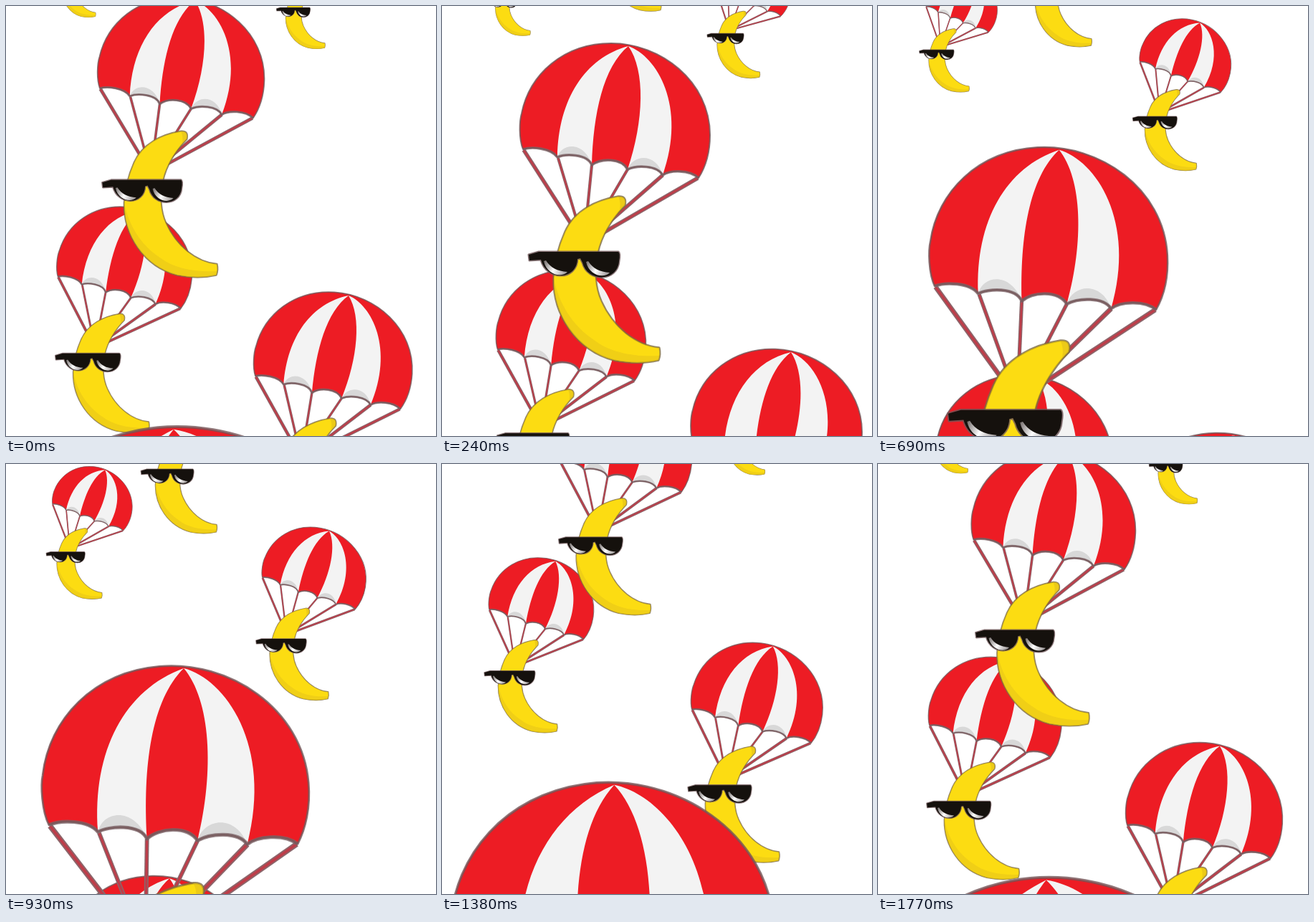
Animation of 600x600 px, one loop 1800 ms. Source, as an HTML page with a canvas:

```html
<!DOCTYPE html>
<html lang="en">
<head>
<meta charset="utf-8">
<title>Parachuting bananas</title>
<style>
  html, body { margin: 0; width: 100%; height: 100%; overflow: hidden; background: #fff; }
  canvas { display: block; width: 100vw; height: 100vh; }
</style>
</head>
<body>
<canvas id="stage" width="600" height="600"></canvas>
<script>
const ctx = document.getElementById('stage').getContext('2d');
const LOOP = 1800, STEP = 30;

// All shapes share one drawing space; ropes meet at the harness.
const HARNESS = [198, 332];
const SPIN = -0.0071; // degrees per ms

const hemCurve = 'C345 228 318 229 308 236 C300 222 272 222 259 228 C250 212 222 212 209 222 ' +
  'C203 206 172 206 161 211 C152 198 125 196 113 200';
const canopy = new Path2D('M113 200 C107 185 108 160 111 150 C122 95 170 52 236 52 ' +
  'C305 52 374 105 374 180 C374 205 367 226 358 240 ' + hemCurve + 'Z');
const hem = new Path2D('M358 240 ' + hemCurve);
const stripes = new Path2D(
  'M260 56 C200 72 162 130 161 211 C172 206 203 206 209 222 C211 150 225 85 260 56Z ' +
  'M260 56 C284 90 282 160 259 228 C272 222 300 222 308 236 C342 140 300 70 260 56Z');
const folds = new Path2D(
  'M161 211 C168 189 200 190 209 222 C203 206 172 206 161 211Z ' +
  'M259 228 C268 205 300 206 308 236 C300 222 272 222 259 228Z');
const ropeTops = [[114, 201], [162, 212], [209, 222], [259, 228], [308, 236], [357, 240]];

const banana = new Path2D('M246 266 C215 271 185 286 172 315 C164 333 157 355 156 380 ' +
  'C155 430 187 480 240 494 C265 499 285 498 302 494 Q305 486 303 477 ' +
  'C270 474 238 448 222 412 C213 392 212 370 217 345 C222 320 238 295 255 278 Q258 265 246 266Z');
const bananaShade = new Path2D('M156 380 C155 430 187 480 240 494 C265 499 285 498 302 494 ' +
  'L303 488 C270 490 235 484 212 466 C182 446 163 415 156 380Z');
const bananaTip = new Path2D('M246 266 Q258 265 255 278 L248 284 Q250 274 246 266Z');
const glasses = new Path2D('M121 347 L135 343 L246 343 Q249 345 247 356 C245 385 203 386 196 358 ' +
  'L193 352 L189 353 C188 383 146 384 138 354 L122 355Z');
const glint = new Path2D('M142 356 C146 375 167 380 175 371 C161 370 151 365 145 355Z');

const glintFill = ctx.createLinearGradient(142, 357, 176, 374);
glintFill.addColorStop(0, '#77706f');
glintFill.addColorStop(0.45, '#ffffff');
glintFill.addColorStop(1, '#8d8686');

// Keys: time, harness x, harness y, scale. "level" is when the canopy has no extra tilt.
const flyers = [
  { level: 2550, keys: [
    [-300, 98, -60, .295], [0, 92, -36, .312], [240, 88.5, -13, .328], [450, 88, 14, .348],
    [690, 87, 57, .38], [930, 89, 118, .425], [1380, 102, 282.6, .556], [1800, 124, 477, .714],
    [2040, 138, 587.6, .79], [2250, 150, 677.5, .857], [2490, 162, 775, .93], [2850, 177, 896, 1.04]] },
  { level: 2300, keys: [
    [-700, 420, -58, .335], [-420, 414, -42, .345], [0, 406, -1.7, .37], [240, 401, 34, .402],
    [450, 397, 79, .438], [690, 393, 149, .486], [930, 391.5, 238, .552], [1380, 397, 440.5, .696],
    [1800, 412, 631, .836], [2040, 423, 730, .902], [2250, 432, 810, .97], [2600, 440, 925, 1.08]] },
  { level: 2040, keys: [
    [0, 266, -84, .43], [240, 257, -69, .46], [450, 250.5, -54.5, .49], [690, 242, -31, .53],
    [930, 233, 1, .578], [1380, 217, 94.5, .7], [1800, 202, 233, .878], [2040, 198, 332, 1],
    [2250, 194.5, 431.5, 1.118], [2490, 194.5, 550, 1.252], [2730, 194.5, 678, 1.402],
    [3180, 202, 927, 1.7], [3570, 217, 1146, 2], [3700, 222, 1219, 2.1]] }
];

// Smooth curve through unevenly spaced keys.
function sample(keys, t) {
  let i = 0;
  while (i < keys.length - 2 && t > keys[i + 1][0]) i++;
  const a = keys[i], b = keys[i + 1];
  const p = keys[Math.max(i - 1, 0)], n = keys[Math.min(i + 2, keys.length - 1)];
  const d = b[0] - a[0], u = (t - a[0]) / d, v = 1 - u;
  return [1, 2, 3].map(k => {
    const ma = (b[k] - p[k]) / (b[0] - p[0]) * d;
    const mb = (n[k] - a[k]) / (n[0] - a[0]) * d;
    return v * v * (1 + 2 * u) * a[k] + u * v * v * ma + u * u * (3 - 2 * u) * b[k] - u * u * v * mb;
  });
}

function fill(path, color) {
  ctx.fillStyle = color;
  ctx.fill(path);
}

function stroke(path, color, width) {
  ctx.strokeStyle = color;
  ctx.lineWidth = width;
  ctx.stroke(path);
}

function drawParachute() {
  ropeTops.forEach(([x, y], i) => {
    const rope = new Path2D();
    rope.moveTo(x, y);
    rope.lineTo(...HARNESS);
    const w = i > 3 || i === 0 ? 5.5 : 4.2;
    stroke(rope, '#8c666b', w);
    stroke(rope, '#bd3d49', w * 0.5);
  });
  fill(canopy, '#ed1c24');
  fill(stripes, '#f3f3f3');
  fill(folds, '#d8d8d8');
  stroke(hem, 'rgba(125,100,104,.75)', 3.6);
  stroke(canopy, 'rgba(115,85,88,.8)', 2);
}

function drawBanana() {
  stroke(banana, 'rgba(125,108,70,.8)', 3.4);
  fill(banana, '#fcdc12');
  fill(bananaShade, '#f0cf16');
  fill(bananaTip, '#ecca18');
  stroke(banana, 'rgba(150,125,30,.4)', 1.4);
  stroke(glasses, 'rgba(110,85,88,.8)', 3);
  fill(glasses, '#15110d');
  fill(glint, glintFill);
  ctx.save();
  ctx.translate(59, 1);
  fill(glint, glintFill);
  ctx.restore();
}

function drawFlyer(flyer, t) {
  const [x, y, s] = sample(flyer.keys, t);
  const [hx, hy] = HARNESS;
  ctx.save();
  ctx.translate(x, y);
  ctx.scale(s, s);
  ctx.save();
  ctx.rotate((t - flyer.level) * SPIN * Math.PI / 180);
  ctx.translate(-hx, -hy);
  drawParachute();
  ctx.restore();
  ctx.translate(-hx, -hy);
  drawBanana();
  ctx.restore();
}

function draw(time) {
  ctx.fillStyle = '#fff';
  ctx.fillRect(0, 0, 600, 600);
  ctx.lineJoin = 'round';
  for (const flyer of flyers) {
    const start = flyer.keys[0][0], end = flyer.keys[flyer.keys.length - 1][0];
    for (let t = time - LOOP; t <= end; t += LOOP) {
      if (t >= start) drawFlyer(flyer, t);
    }
  }
}

const begin = performance.now();
function tick() {
  const t = Math.max(0, performance.now() - begin) % LOOP;
  draw(Math.floor(t / STEP) * STEP);
  requestAnimationFrame(tick);
}
tick();
</script>
</body>
</html>
```
